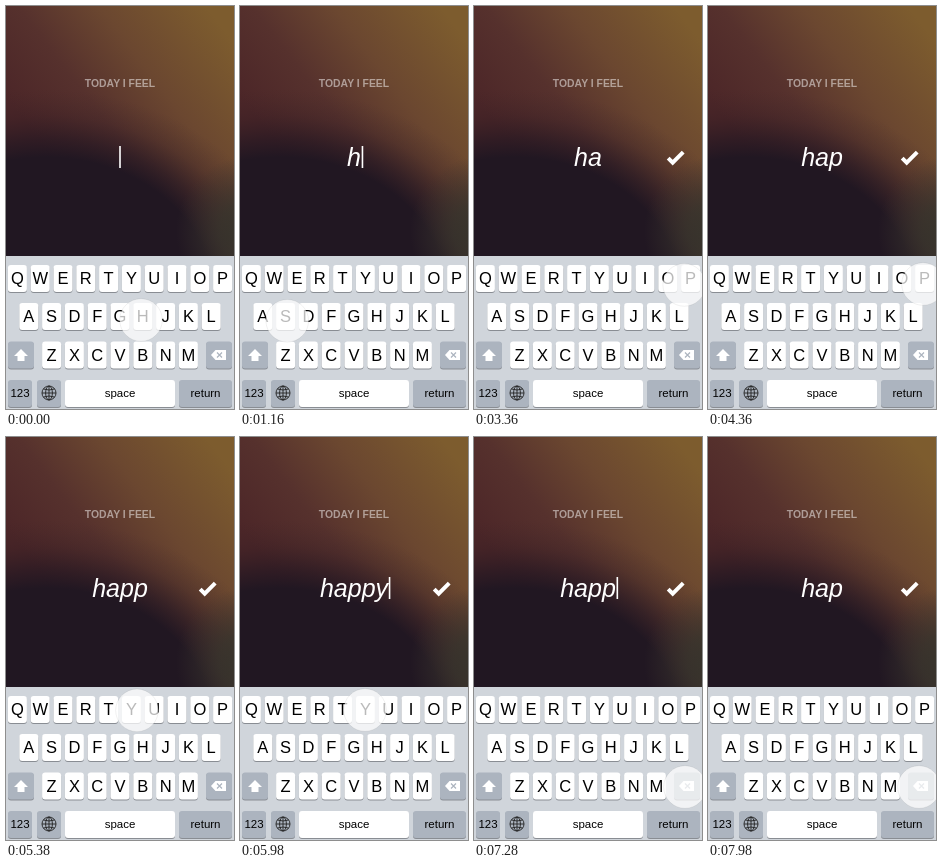
Recreate the animation shown at these times as an HTML page. Size 228 by 403 pixels, loop 8000 ms.

```html
<!DOCTYPE html>
<html lang="en">
<head>
<meta charset="utf-8">
<title>Today I feel</title>
<style>
  html, body { margin: 0; width: 100%; height: 100%; overflow: hidden; background: #211722; }
  svg { display: block; width: 100%; height: 100%; }
  text { font-family: "Liberation Sans", Arial, sans-serif; text-anchor: middle; }
  .title { font-size: 10.4px; font-weight: bold; fill: #fff; fill-opacity: .5; }
  .word { font-size: 25px; font-style: italic; fill: #fff; }
  .letter { font-size: 16.5px; }
  .label { font-size: 11.5px; }
</style>
</head>
<body>
<svg id="stage" viewBox="0 0 228 403">
  <defs>
    <linearGradient id="warm" gradientUnits="userSpaceOnUse" x1="30" y1="130" x2="200" y2="0">
      <stop offset="0" stop-color="#4c2628"/>
      <stop offset=".3" stop-color="#56312d"/>
      <stop offset=".6" stop-color="#6b4730"/>
      <stop offset="1" stop-color="#7d5c2e"/>
    </linearGradient>
    <radialGradient id="dark" gradientUnits="userSpaceOnUse" cx="0" cy="0" r="1"
        gradientTransform="translate(40 290) scale(250 207)">
      <stop offset="0" stop-color="#211722"/>
      <stop offset=".67" stop-color="#211722"/>
      <stop offset=".76" stop-color="#231722" stop-opacity=".66"/>
      <stop offset=".87" stop-color="#2b1a22" stop-opacity=".25"/>
      <stop offset="1" stop-color="#3a2426" stop-opacity="0"/>
    </radialGradient>
    <radialGradient id="moss" gradientUnits="userSpaceOnUse" cx="0" cy="0" r="1"
        gradientTransform="translate(242 225) scale(72 75)">
      <stop offset="0" stop-color="#35342c"/>
      <stop offset=".4" stop-color="#38352d" stop-opacity=".8"/>
      <stop offset="1" stop-color="#3a332e" stop-opacity="0"/>
    </radialGradient>
  </defs>
  <rect width="228" height="251" fill="url(#warm)"/>
  <rect width="228" height="251" fill="url(#dark)"/>
  <rect width="228" height="251" fill="url(#moss)"/>

  <text class="title" x="114" y="81">TODAY I FEEL</text>
  <text class="word" id="word" x="114" y="159.7"></text>
  <rect id="caret" y="140" width="1.6" height="22" fill="#fff"/>
  <path id="check" d="M-7.5 .5 L-3 5 L7.5 -5.5" fill="none" stroke="#fff" stroke-width="4"/>

  <rect y="250" width="228" height="153" fill="#d0d5db"/>
  <g id="keys"></g>

  <path d="M15 343 L22 350 H18.5 V355 H11.5 V350 H8 Z" fill="#fff"/>
  <path d="M205 349 L209.5 344 H220 V354 H209.5 Z" fill="#fff"/>
  <path d="M211 346.5 l5 5 m0 -5 l-5 5" stroke="#acb4bf" stroke-width="1.2"/>
  <g fill="none" stroke="#222" stroke-width=".9">
    <circle cx="43" cy="387" r="7"/>
    <ellipse cx="43" cy="387" rx="3.4" ry="7"/>
    <path d="M36 387 h14 M43 380 v14 M37.5 383 q5.5 2 11 0 M37.5 391 q5.5 -2 11 0"/>
  </g>

  <circle id="touch" r="21.3" fill="#fff" fill-opacity=".73" stroke="#000" stroke-opacity=".06"/>
</svg>
<script>
const $ = id => document.getElementById(id);
const LOOP = 8000, CENTER = 114, BLINK = 1000;

// Keyboard
const WHITE = '#fff', GREY = '#acb4bf';
let keysMarkup = '';
function addKey(x, y, width, fill, label = '', style = 'label') {
  const rect = (top, color) =>
    `<rect x="${x}" y="${top}" width="${width}" height="27" rx="3" fill="${color}"/>`;
  const baseline = y + (style === 'letter' ? 19.3 : 17.3);
  keysMarkup += rect(y + 1, '#898d93') + rect(y, fill) +
    `<text class="${style}" x="${x + width / 2}" y="${baseline}">${label}</text>`;
}
[['QWERTYUIOP', 11.4, 259], ['ASDFGHJKL', 22.8, 297], ['ZXCVBNM', 45.6, 335.5]]
  .forEach(([letters, firstX, y]) => [...letters].forEach((letter, i) =>
    addKey(firstX + i * 22.8 - 9.5, y, 19, WHITE, letter, 'letter')));
addKey(2, 335.5, 26, GREY);
addKey(200, 335.5, 26, GREY);
addKey(2, 374, 24, GREY, '123');
addKey(31, 374, 24, GREY);
addKey(59, 374, 110, WHITE, 'space');
addKey(173, 374, 53, GREY, 'return');
$('keys').innerHTML = keysMarkup;

// Text after each key press: [time, word]
const presses = [
  [0, ''], [720, 'h'], [1750, 'ha'], [3700, 'hap'], [4500, 'happ'],
  [5800, 'happy'], [7050, 'happ'], [7400, 'hap']
];
const CHECK_START = 1750;

// Finger moves: [start, end, x, y]
const moves = [
  [0, 0, 135, 314], [800, 1320, 22, 315], [2600, 3440, 215, 278],
  [4850, 5480, 125, 273], [6100, 6800, 211, 350]
];

const smooth = u => u * u * (3 - 2 * u);
const clamp = u => Math.max(0, Math.min(1, u));

function fingerAt(t) {
  let [, , x, y] = moves[0];
  for (const [start, end, toX, toY] of moves.slice(1)) {
    const u = smooth(clamp((t - start) / (end - start)));
    x += (toX - x) * u;
    y += (toY - y) * u;
  }
  return [x, y];
}

function checkX(t) {
  const s = (t - CHECK_START) / 1000;
  return s < 0 ? 260 : 201.7 + 40 * Math.exp(-5 * s) * Math.cos(5.2 * s);
}

function draw(t) {
  const [pressed, word] = presses.filter(([time]) => time <= t).pop();
  const wordNode = $('word');
  if (wordNode.textContent !== word) wordNode.textContent = word;
  const width = word ? wordNode.getComputedTextLength() : 0;
  $('caret').setAttribute('x', CENTER + width / 2 + (word ? .7 : -.8));
  $('caret').setAttribute('visibility',
    (t - pressed) % BLINK < BLINK / 2 ? 'visible' : 'hidden');
  $('check').setAttribute('transform', `translate(${checkX(t)} 151.7)`);
  $('touch').setAttribute('transform', `translate(${fingerAt(t)})`);
}

const began = performance.now();
function tick() {
  draw((performance.now() - began) % LOOP);
  requestAnimationFrame(tick);
}
tick();
</script>
</body>
</html>
```
